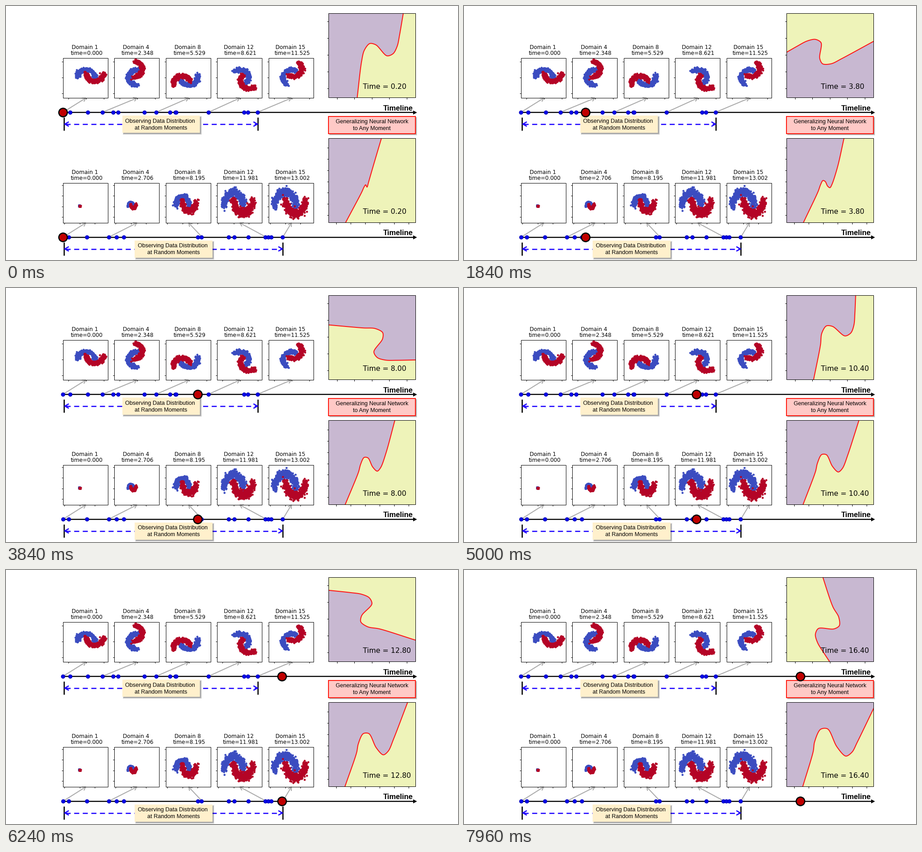
Recreate the animation shown at these times as a matplotlib script. Size 998 px wide and 561 px high, loop 8 s.

```python
import numpy as np
import matplotlib.pyplot as plt
from matplotlib.animation import FuncAnimation
from matplotlib.patches import Circle, Polygon, Rectangle

W, H, DPI = 998, 561, 64
PT = 72 / DPI
FRAMES, STEP_MS = 200, 40
ROW = 276  # distance between the two rows

BLUE, RED = "#3b4cc0", "#b40426"
PURPLE, YELLOW, EDGE = "#c8b8d1", "#eef3b9", "#ff1414"
CREAM, INK, GRAY = "#fff0cc", "#1f05ff", "#a9a9a9"

fig = plt.figure(figsize=(W / DPI, H / DPI), dpi=DPI, facecolor="white")
ax = fig.add_axes([0, 0, 1, 1])
ax.set_xlim(0, W)
ax.set_ylim(H, 0)
ax.axis("off")
rng = np.random.default_rng(7)


def line(xs, ys, color="black", lw=1.0, z=3, **kw):
    kw.setdefault("solid_capstyle", "butt")
    return ax.plot(xs, ys, color=color, lw=lw * PT, zorder=z, **kw)[0]


def label(x, y, s, size, font="DejaVu Sans", ha="center", **kw):
    return ax.text(x, y, s, fontsize=size * PT, family=font, ha=ha,
                   va="baseline", zorder=9, **kw)


def box(x0, y0, x1, y1, z=2, **kw):
    return ax.add_patch(Rectangle((x0, y0), x1 - x0, y1 - y0, zorder=z, **kw))


def open_head(x, y, angle, size, color, lw, z):
    a = angle + np.pi + np.array([-0.52, 0.52])
    hx, hy = x + size * np.cos(a), y + size * np.sin(a)
    line([hx[0], x, hx[1]], [hy[0], y, hy[1]], color, lw, z,
         solid_joinstyle="miter")


def arrow(x0, y0, x1, y1):
    line([x0, x1], [y0, y1], GRAY, 2, 4)
    open_head(x1, y1, np.arctan2(y1 - y0, x1 - x0), 9, GRAY, 2, 4)


def panel(x0, y0, x1, y1, xticks, yticks):
    box(x0, y0, x1, y1, z=6, fill=False, ec="black", lw=PT)
    for x in xticks:
        line([x, x], [y1, y1 + 3.5], z=6)
    for y in yticks:
        line([x0 - 3.5, x0], [y, y], z=6)


def rotate(p, deg):
    c, s = np.cos(np.radians(deg)), np.sin(np.radians(deg))
    return np.stack([c * p[0] - s * p[1], s * p[0] + c * p[1]])


def moons(noise, n=500):
    a = rng.uniform(0, np.pi, (2, n))
    upper = np.stack([np.cos(a[0]), np.sin(a[0])])
    lower = np.stack([1 - np.cos(a[1]), 0.5 - np.sin(a[1])])
    return [m + rng.normal(0, noise, m.shape) for m in (upper, lower)]


def domain(x0, y0, name, t, origin, scale, deg, noise, xticks, yticks):
    clip = box(x0, y0, x0 + 99, y0 + 88, fc="white", ec="none")
    for pts, color in zip(moons(noise), (BLUE, RED)):
        px, py = rotate(pts, deg)
        dots = line(x0 + origin[0] + scale[0] * px,
                    y0 + origin[1] - scale[1] * py, color, ls="none",
                    marker="o", ms=4.6 * PT, mew=0)
        dots.set_clip_path(clip)
    panel(x0, y0, x0 + 99, y0 + 88, x0 + xticks, y0 + yticks)
    label(x0 + 47.2, y0 - 19.5, f"Domain {name}", 12)
    label(x0 + 51.3, y0 - 6.5, f"time={t:.3f}", 12)


def note(x0, y0, x1, y1, fc, ec, first, second, shift=0):
    for k in range(5):
        box(x0 + 1 + k / 2, y0 + 1 + k / 2, x1 + 4 - k / 2, y1 + 4 - k / 2, z=7,
            fc="black", ec="none", alpha=0.08)
    box(x0, y0, x1, y1, z=8, fc=fc, ec=ec, lw=2 * PT)
    cx = (x0 + x1) / 2
    label(cx + shift, y0 + 15.5, first, 12.45, "Liberation Sans")
    label(cx - 0.5, y0 + 30.5, second, 12.45, "Liberation Sans")


def timeline(y, dots):
    line([126, 901], [y, y], lw=2.4, z=5)
    ax.add_patch(Polygon([(899, y - 4.5), (907.5, y), (899, y + 4.5)],
                         fc="black", ec="none", zorder=5))
    for x in dots:
        ax.add_patch(Circle((x, y), 4.1, fc="#0505e8", ec="#0000b0",
                            lw=PT, zorder=6))
    for x0, name in zip(LEFT, NAMES):
        arrow(dots[name - 1] + 0.5, y - 1, x0 + 49.7, y - 32)
    label(865.5, y - 4.8, "Timeline", 16.4, "Liberation Sans", weight="bold")

    end, ym = dots[-1], y + 25.5
    for x in (128.5, end):
        line([x, x], [y + 11, y + 40], lw=2.6, z=5)
    line([131, end - 2], [ym, ym], INK, 2.6, 5,
         dashes=(4.3, 3), dash_capstyle="butt")
    open_head(130, ym, np.pi, 10, INK, 2.6, 5)
    open_head(end - 1, ym, 0, 10, INK, 2.6, 5)
    return ax.add_patch(Circle((126, y), 9.4, fc="#c00000", ec="black",
                               lw=2.6 * PT, zorder=12))


# Observed domains: the upper row turns with time, the lower row grows.
NAMES = (1, 4, 8, 12, 15)
LEFT = np.round(126 + 113.4 * np.arange(5)) + 0.5
for x0, name, t in zip(LEFT, NAMES, (0, 2.348, 5.529, 8.621, 11.525)):
    domain(x0, 114.5, name, t, (50, 43), (19.2, 17.3), 36 * t, 0.12,
           11.5 + 39 * np.arange(3), 8 + 35 * np.arange(3))
for x0, name, t in zip(LEFT, NAMES, (0, 2.706, 8.195, 11.981, 13.002)):
    size = 1.5 + 2.35 * t
    domain(x0, 114.5 + ROW, name, t, (35.6, 51.5), (0.72 * size, size), 0, 0.15,
           3 + 33.5 * np.arange(3), 5.5 + 23.3 * np.arange(4))

markers = [
    timeline(235.3, (126, 142, 181, 213.5, 237, 248, 306, 332, 362.5, 374.5,
                     376, 447.5, 526, 534.5, 556)),
    timeline(235 + ROW, (126.5, 139, 179, 227.5, 244.5, 260.5, 424, 432, 492,
                         504.5, 535.5, 573, 579.5, 586, 611)),
]

for x, y in ((257, 242), (284.5, 242 + ROW)):
    note(x, y, x + 171.5, y + 38, CREAM, "none",
         "Observing Data Distribution", "at Random Moments", -2.3)
note(712.5, 243.5, 904, 281.5, "#ffc9c6", "#ff1a10",
     "Generalizing Neural Network", "to Any Moment")

# Upper boundary: an S curve around the centre, in pixels with y up.
CENTER = np.array([808, 108])
S_CURVE = np.array([(-32, -92), (-23, -15), (-17, 10), (-5, 25), (9, 22),
                    (33, -2), (47, 3), (56, 20), (61, 44), (68, 85)], float)
# Lower boundary: a small kink that grows into a deep wave.
KINK = np.array([(750, 478), (785, 412), (791, 399), (794, 395), (796, 398),
                 (797, 400), (798, 398.5), (800, 391), (813, 346), (829, 292)])
WAVE = np.array([(748, 478), (771, 401), (774, 380), (787, 352), (803, 351),
                 (823, 390), (843, 411), (857, 402), (868, 381), (912, 290)])


def turning(t):
    pts = S_CURVE.copy()
    pts[0, 0] -= 1.6 * t  # the lower tail bends outward slowly
    return rotate(pts.T, 36 * (t - 0.2)).T * (1, -1) + CENTER


def growing(t):
    u = (t - 0.2) / 16.2
    ease = np.full((len(KINK), 1), u)
    ease[-1] = u**1.4
    return KINK + (WAVE - KINK) * ease


def smooth(pts, n=10, tension=0.88):
    """Hermite curve through the points, with long straight tails."""
    gaps = np.sqrt(np.hypot(*np.diff(pts, axis=0).T))
    m = tension * np.gradient(pts, np.r_[0, np.cumsum(gaps)], axis=0)
    u = np.linspace(0, 1, n, endpoint=False)[None, :, None]
    d = gaps[:, None, None]
    p0, p1 = pts[:-1, None], pts[1:, None]
    m0, m1 = m[:-1, None] * d, m[1:, None] * d
    c = ((2 * u**3 - 3 * u**2 + 1) * p0 + (u**3 - 2 * u**2 + u) * m0
         + (3 * u**2 - 2 * u**3) * p1 + (u**3 - u**2) * m1)
    c = np.vstack([c.reshape(-1, 2), pts[-1]])
    head, tail = c[0] - c[1], c[-1] - c[-2]
    return np.vstack([c[0] + 400 * head / np.hypot(*head), c,
                      c[-1] + 400 * tail / np.hypot(*tail)])


class Field:
    def __init__(self, y0, shape, xticks, yticks):
        self.shape = shape
        y1 = y0 + 186.5
        clip = box(712.5, y0, 904, y1, fc=YELLOW, ec="none")
        self.area = ax.add_patch(Polygon([(0, 0), (1, 0), (1, 1)], fc=PURPLE,
                                         ec="none", zorder=3))
        self.edge = line([], [], EDGE, 2, 4, solid_joinstyle="round")
        for artist in (self.area, self.edge):
            artist.set_clip_path(clip)
        panel(712.5, y0, 904, y1, xticks, yticks)
        self.text = label(788.2, y1 - 19, "", 15.6, ha="left")

    def show(self, t):
        c = smooth(self.shape(t))
        d = c[-1] - c[0]
        side = 800 * np.array([d[1], -d[0]]) / np.hypot(*d)
        self.area.set_xy(np.vstack([c, c[-1] + side, c[0] + side]))
        self.edge.set_data(c[:, 0], c[:, 1])
        self.text.set_text(f"Time = {t:.2f}")


fields = [
    Field(15.5, turning, 731 + 38.5 * np.arange(5), 34.2 + 36.9 * np.arange(5)),
    Field(15.5 + ROW, growing, 729 + 32 * np.arange(6),
          313.4 + 24.7 * np.arange(7)),
]


def update(i):
    t = 0.2 * int(1.1 + 0.408 * i)
    for field in fields:
        field.show(t)
    for m in markers:
        m.center = (126 + 3.1 * i, m.center[1])
    return []


anim = FuncAnimation(fig, update, frames=FRAMES, interval=STEP_MS,
                     init_func=lambda: update(0), repeat=True, repeat_delay=0,
                     blit=False)
plt.show()
```
